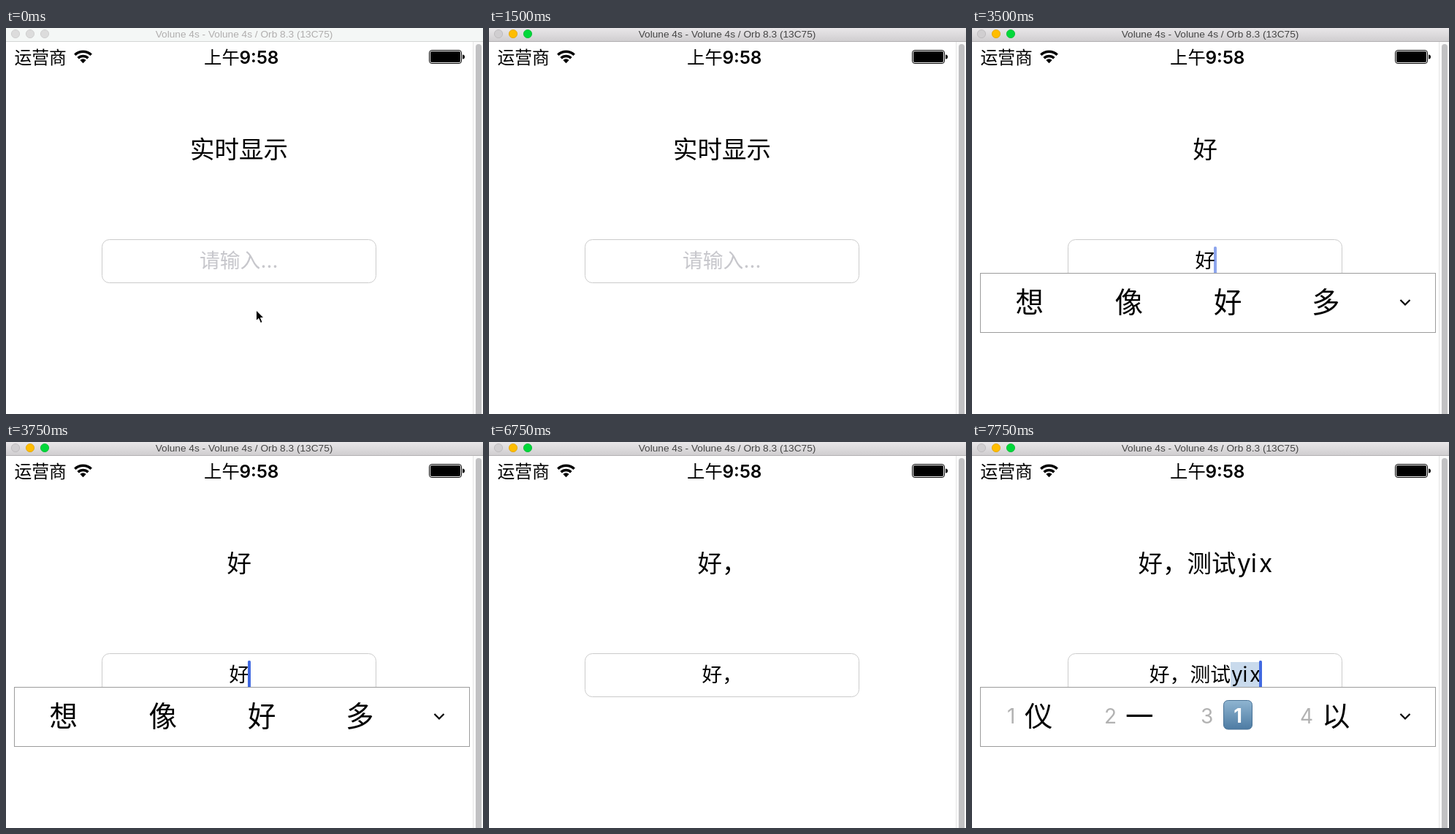
An HTML page that plays this animation: 653 px wide and 528 px high, repeating every 8000 ms.

```html
<!DOCTYPE html>
<html lang="zh-CN">
<head>
<meta charset="utf-8">
<title>实时显示</title>
<style>
  html, body { margin: 0; width: 100%; height: 100%; overflow: hidden; background: #fff; }
  svg { display: block; width: 653px; height: 528px; }
  text { font-family: Inter, "Noto Sans CJK SC", "Noto Sans CJK", sans-serif; white-space: pre; }
  .title { font: 13.7px "Liberation Sans", Arial, sans-serif; }
  .label { font-size: 33.5px; }
  .field { font-size: 27.8px; }
  .num { font-size: 28px; fill: #b2b2b2; }
  .word { font-size: 38.5px; }
</style>
</head>
<body>
<svg viewBox="0 0 653 528" lang="zh-CN">
  <defs>
    <linearGradient id="bar" x2="0" y2="1">
      <stop offset="0" stop-color="#e9e7e9"/><stop offset="1" stop-color="#d0ced0"/>
    </linearGradient>
    <linearGradient id="key" x2="0" y2="1">
      <stop offset="0" stop-color="#8fb5d1"/><stop offset="1" stop-color="#4d7ba3"/>
    </linearGradient>
    <g id="hand" stroke-linecap="round" stroke-linejoin="round">
      <path d="M368 376L360.5 357M373 374L368.5 357M377.5 375L377 363" fill="none"/>
      <circle cx="356" cy="377" r="6" fill="none"/>
      <path d="M366 374L378 373L380 382L376 390H367L362 385L366 381Z"/>
    </g>
  </defs>

  <rect width="653" height="528" fill="#fff"/>
  <rect x="639" y="19" width="14" height="509" fill="#fafafa"/>
  <path d="M639.5 19V528" stroke="#e6e6e6"/>
  <rect x="643" y="22" width="8" height="520" rx="4" fill="#c1c1c3"/>

  <rect id="top" width="653" height="18"/>
  <path id="edge" d="M0 18.5H653"/>
  <g id="lights"></g>
  <text id="title" class="title" x="326" y="13" text-anchor="middle">Volune 4s - Volune 4s / Orb 8.3 (13C75)</text>

  <text x="11.5" y="49" font-size="23.8">运营商</text>
  <g fill="none" stroke="#000" stroke-width="3.4">
    <path d="M94.3 36.8A16 16 0 0 1 116.7 36.8"/>
    <path d="M98.6 41.3A9.8 9.8 0 0 1 112.4 41.3"/>
    <path d="M101.4 44A5.8 5.8 0 0 1 109.6 44L105.5 48.2Z" fill="#000" stroke="none"/>
  </g>
  <text x="271" y="48.6" font-size="24.4" font-weight="500">上午<tspan x="319.5" font-weight="600">9:58</tspan></text>
  <rect x="579.5" y="30.5" width="44" height="18" rx="3.5" fill="#fff" stroke="#000"/>
  <rect x="581" y="32" width="41" height="15" rx="2"/>
  <path d="M625 36.5Q628 36.5 628 39.5Q628 42.5 625 42.5Z"/>

  <text id="label" class="label" y="177.6"></text>
  <rect x="131.5" y="289.5" width="375" height="59" rx="10" fill="#fff" stroke="#cbcbcb"/>
  <rect id="mark" y="301" height="35" fill="#c9daec"/>
  <text id="field" class="field" y="328.4"></text>
  <rect id="caret" y="299" width="4" height="37" rx="1.5" fill="#4169e1"/>

  <g id="panel">
    <rect x="11.5" y="335.5" width="623" height="81" fill="#fff" stroke="#9c9c9c"/>
    <g id="words"></g>
    <path d="M586.5 372L593 378.5L599.5 372" fill="none" stroke="#000" stroke-width="2.2"/>
  </g>

  <path id="cursor" d="M0 0V14.5L3.4 11.4L6 17.5L8.6 16.4L6 10.5H10.5Z" stroke="#fff" stroke-width="1"/>
</svg>
<script>
const $ = id => document.getElementById(id);
const LOOP = 8000;

const runs = list => list.map(([x, s]) => `<tspan x="${x}">${s}</tspan>`).join('');
const word = (x, s) => `<text class="word" x="${x}" y="389">${s}</text>`;

const okHand = `<use href="#hand" fill="#eda736" stroke="#eda736" stroke-width="6.6"/>
  <use href="#hand" fill="#ffca4b" stroke="#ffca4b" stroke-width="5"/>`;
const keycap = `<rect x="344.5" y="353.5" width="39" height="39.5" rx="6" fill="url(#key)" stroke="#4a7397"/>
  <text x="364" y="384" font-size="27" font-weight="700" fill="#fff" text-anchor="middle">1</text>`;

const numX = [48, 181, 313, 449], wordX = [72, 210, 344, 479], nextX = [59.5, 195.5, 331, 465];
const numbered = list => list.map((s, i) =>
  `<text class="num" x="${numX[i]}" y="385">${i + 1}</text>` +
  (s[0] === '<' ? s : word(wordX[i], s))).join('');

const panels = {
  h: numbered(['和', '好', okHand, '还']),
  next: [...'想像好多'].map((s, i) => word(nextX[i], s)).join(''),
  ce: numbered(['测', '策', '册', '侧']),
  yi: numbered(['仪', '一', keycap, '以'])
};

// Each step lists only what changes from the one before.
const steps = [
  [0, { on: false, cursor: [342.5, 386], label: [[252, '实时显示']], field: [[265, '请输入...']],
        hint: true, caret: 261, alpha: 0, mark: null, panel: null }],
  [250, { on: true, cursor: [427, 322] }],
  [500, { alpha: 1 }],
  [1000, { alpha: 0 }],
  [1250, { alpha: 1 }],
  [1500, { alpha: 0, cursor: null }],
  [2000, { alpha: 1 }],
  [2500, { label: [[308.5, 'h']], field: [[310, 'h']], hint: false, caret: 325, mark: [310, 17] }],
  [2750, { panel: 'h' }],
  [3000, { alpha: .6 }],
  [3500, { label: [[302.5, '好']], field: [[305.5, '好']], caret: 331, mark: null, panel: 'next' }],
  [3750, { alpha: 1 }],
  [4250, { label: [[285.5, '好，']], field: [[291.5, '好，']], caret: 345, panel: null }],
  [4500, { alpha: .5 }],
  [4750, { alpha: 0 }],
  [5000, { alpha: 1 }],
  [5500, { alpha: .5 }],
  [5750, { alpha: 0 }],
  [6000, { alpha: 1 }],
  [6250, { alpha: .9 }],
  [6500, { alpha: .5 }],
  [6750, { alpha: 0 }],
  [7000, { label: [[267, '好，'], [334, 'ce']], field: [[276, '好，'], [331.5, 'ce']],
           caret: 361, alpha: 1, mark: [331, 31], panel: 'ce' }],
  [7250, { label: [[252, '好，测试']], field: [[263.5, '好，测试']], caret: 373, mark: null, panel: null }],
  [7500, { label: [[238, '好，测试'], [373, 'yi']], field: [[252, '好，测试'], [364, 'yi']],
           caret: 385, mark: [363, 23], panel: 'yi' }],
  [7750, { label: [[227.5, '好，测试'], [363, 'yi'], [393, 'x']],
           field: [[242.8, '好，测试'], [355, 'yi'], [380, 'x']], caret: 393, mark: [354, 40] }]
];
const states = [];
steps.forEach(([, change], i) => states.push({ ...states[i - 1], ...change }));

function set(id, attrs) {
  for (const k in attrs) $(id).setAttribute(k, attrs[k]);
}
const show = (id, yes) => set(id, { display: yes ? 'inline' : 'none' });

function draw(s) {
  set('top', { fill: s.on ? 'url(#bar)' : '#f4f7f6' });
  set('edge', { stroke: s.on ? '#b3b1b3' : '#d4d6d5' });
  set('title', { fill: s.on ? '#454545' : '#b0aeae' });
  const lights = s.on
    ? [['#d0ced0', '#b9b7b9'], ['#ffbd00', '#e0a300'], ['#00d83a', '#00b82e']]
    : Array(3).fill(['#dcdcdc', '#c9c9c9']);
  $('lights').innerHTML = lights.map(([fill, edge], i) =>
    `<circle cx="${13 + 20 * i}" cy="8" r="5.6" fill="${fill}" stroke="${edge}" stroke-width=".8"/>`).join('');

  $('label').innerHTML = runs(s.label);
  $('field').innerHTML = runs(s.field);
  set('field', { fill: s.hint ? '#c7c7cc' : '#000' });
  set('caret', { x: s.caret, opacity: s.alpha });
  show('mark', s.mark);
  if (s.mark) set('mark', { x: s.mark[0], width: s.mark[1] });
  show('panel', s.panel);
  $('words').innerHTML = panels[s.panel] || '';
  show('cursor', s.cursor);
  if (s.cursor) set('cursor', { transform: `translate(${s.cursor})` });
}

let last = -1;
function tick() {
  const t = performance.now() % LOOP;
  const i = steps.findLastIndex(([at]) => at <= t);
  if (i !== last) draw(states[last = i]);
  requestAnimationFrame(tick);
}
tick();
</script>
</body>
</html>
```
